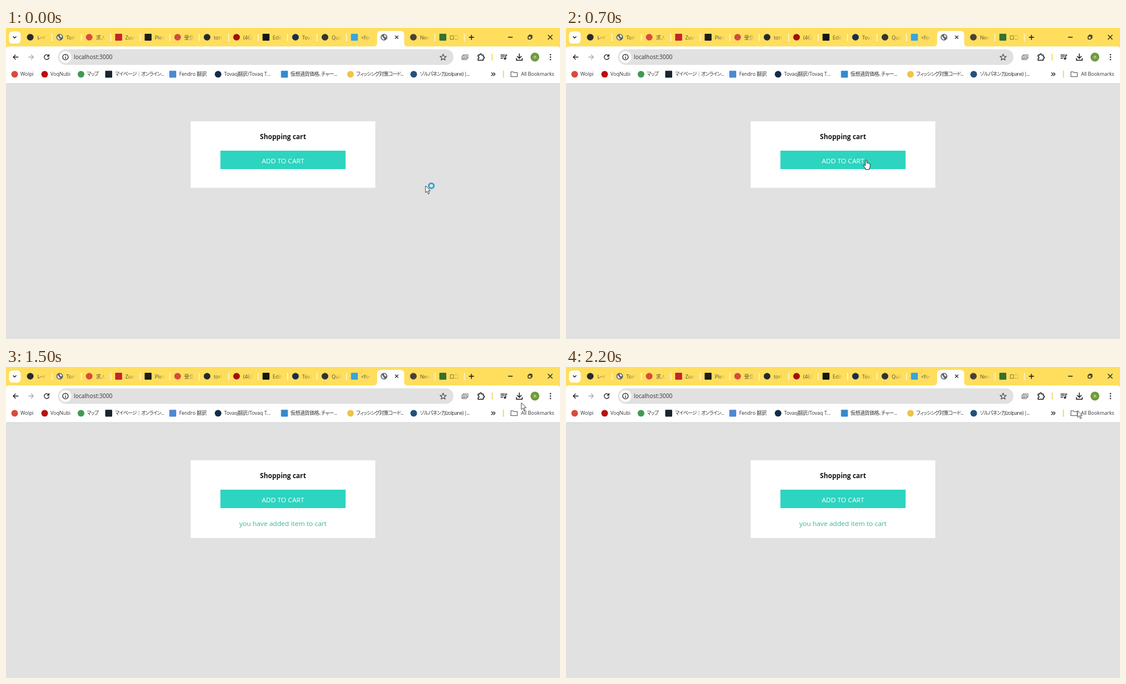
These frames come from a looping animation (960x540 px, 2.3 s). An HTML page:

```html
<!DOCTYPE html>
<html lang="en">
<head>
<meta charset="utf-8">
<title>Shopping cart</title>
<style>
html, body { margin: 0; width: 100%; height: 100%; overflow: hidden; background: #e1e1e1; }
svg { display: block; width: 960px; height: 540px; }
text { font-family: "Open Sans", "Noto Sans CJK JP", "Noto Sans CJK", sans-serif; font-feature-settings: "palt"; }
.line { fill: none; stroke: #222; stroke-width: 1.3; stroke-linecap: round; stroke-linejoin: round; }
.tab { font-size: 8.8px; fill: #5a5030; }
.mark { font-size: 8.6px; fill: #333; }
.cart { font-size: 11.6px; text-anchor: middle; }

#cursor, #arrow, #hand, #busy, #added, #hover { animation: 2300ms step-end infinite; }
#cursor { animation-name: move; }
#arrow { animation-name: arrow; }
#hand { animation-name: hand; }
#busy { animation-name: busy; }
#added { animation-name: added; }
#hover { animation-name: hover; }

@keyframes move {
  0% { transform: translate(727px, 274px); animation-timing-function: steps(5); }
  21.739% { transform: translate(492px, 230px); animation-timing-function: steps(4); }
  39.13% { transform: translate(548px, 228px); animation-timing-function: steps(3); }
  52.173% { transform: translate(549px, 246px); animation-timing-function: steps(3); }
  65.217% { transform: translate(893px, 62px); animation-timing-function: steps(3); }
  78.26% { transform: translate(911.5px, 55.5px); animation-timing-function: steps(4); }
  95.652%, 100% { transform: translate(886.5px, 75.5px); }
}
@keyframes arrow {
  0%, 56.521% { opacity: 1; }
  17.391% { opacity: 0; }
  100% { opacity: 1; }
}
@keyframes hand {
  0%, 56.521% { opacity: 0; }
  17.391% { opacity: 1; }
  100% { opacity: 0; }
}
@keyframes busy {
  0% { opacity: 1; }
  8.695%, 100% { opacity: 0; }
}
@keyframes added {
  0% { opacity: 0; }
  43.478%, 100% { opacity: 1; }
}
@keyframes hover {
  0%, 86.956%, 100% { opacity: 0; }
  73.913% { opacity: 1; }
}
</style>
</head>
<body>
<svg viewBox="0 0 960 540">
  <defs>
    <linearGradient id="fade">
      <stop offset="0" stop-color="#ffde5e" stop-opacity="0"/>
      <stop offset="1" stop-color="#ffde5e"/>
    </linearGradient>
    <g id="globe">
      <circle r="5.8" fill="#5f6368"/>
      <path d="M-4.3 -2Q-2 -1.5 -1.5 .2T.8 2.4L-.4 4.6Q-4.4 3.6 -4.3 -2ZM0 -4.5Q3.4 -4 4.3 -.4L2 .4 .4 -1.6Z" fill="#eee"/>
    </g>
  </defs>

  <!-- Browser frame -->
  <rect width="960" height="97" fill="#ffde5e"/>
  <path d="M0 97V37Q0 32 5 32H637Q643 32 643 26V12Q643 5 650 5H683Q690 5 690 12V26Q690 32 696 32H955Q960 32 960 37V97Z" fill="#fff"/>
  <path d="M0 96.5H960" stroke="#d2d2d2"/>
  <rect x="5" y="6" width="20.5" height="21" rx="6" fill="#fffdf5"/>
  <path class="line" d="M12.5 15L15 17.5 17.5 15"/>
  <g id="tabs"></g>
  <use href="#globe" x="655" y="16"/>
  <path class="line" d="M674.6 13.6L679.4 18.4M679.4 13.6L674.6 18.4"/>
  <path class="line" d="M806.5 12.5V20M802.7 16.2H810.3"/>
  <g class="line" stroke-width="1">
    <path d="M870.5 16H877.5M939.5 12.5L946.5 19.5M946.5 12.5L939.5 19.5"/>
    <path d="M906.5 12.5H910.5Q911.5 12.5 911.5 13.5V17.5"/>
    <rect x="904.7" y="14" width="5.3" height="5.3" rx="1"/>
  </g>

  <!-- Toolbar -->
  <path class="line" d="M21 50.5H12.5M16.3 46.7L12.5 50.5 16.3 54.3"/>
  <path class="line" d="M39 50.5H47.5M43.7 46.7L47.5 50.5 43.7 54.3" style="stroke:#aaa"/>
  <path class="line" d="M74 48.4A4.2 4.2 0 1 0 74.5 51.5M74.5 46V49H71.5"/>
  <rect x="90" y="37" width="685.5" height="27" rx="13.5" fill="#e1e1e1"/>
  <circle cx="103" cy="50.5" r="10.2" fill="#fff"/>
  <circle class="line" cx="103" cy="50.5" r="4.8"/>
  <path class="line" d="M103 50.3V53M103 48V48.1"/>
  <text x="117.5" y="54.3" font-size="9.95" fill="#333">localhost:3000</text>
  <path class="line" id="star" style="stroke:#444;stroke-width:1.1"/>
  <g class="line" style="stroke:#777;stroke-width:1.1">
    <path d="M792 48V46.5H800.5V52.5H799"/>
    <rect x="790" y="48.5" width="8.5" height="6.5" rx="1" fill="#ddd"/>
    <path d="M791.5 53.5L793.5 51.5 795 53 796.5 52"/>
  </g>
  <path class="line" style="stroke-width:1.5" d="M818 47H821V46.2A1.5 1.5 0 0 1 824 46.2V47H827V50H827.6A1.5 1.5 0 0 1 827.6 53H827V56H818V53.2A1.7 1.7 0 0 0 818 49.8Z"/>
  <path d="M842.5 44.5V56.5M862 74V86.5" stroke="#f8d75c" stroke-width="1.8"/>
  <path class="line" d="M857.5 47H864M857.5 49.8H864M857.5 52.6H861M866 53.3V47H868"/>
  <circle cx="864.5" cy="53.3" r="1.8" fill="#222"/>
  <path class="line" style="stroke-width:1.6" d="M889.5 45V52.5M886 49.3L889.5 52.7 893 49.3M884.5 53V56H894.5V53"/>
  <circle id="hover" cx="916.5" cy="50.5" r="11.5" fill="#ececec"/>
  <circle cx="916.5" cy="50.5" r="7.7" fill="#719a3b"/>
  <text x="916.5" y="53.2" font-size="7" text-anchor="middle" fill="#dce8c8">木</text>
  <path d="M943.5 46.3V55" stroke="#222" stroke-width="2.4" stroke-linecap="round" stroke-dasharray="0 4.2"/>

  <!-- Bookmarks -->
  <g id="marks"></g>
  <path class="line" d="M841.5 77.7L844 80.2 841.5 82.7M845 77.7L847.5 80.2 845 82.7"/>
  <path class="line" style="stroke:#555;stroke-width:1.1" d="M875 76H879L880.3 77.5H886V84.5H875Z"/>
  <text class="mark" x="892.5" y="83.4">All Bookmarks</text>

  <!-- Page -->
  <rect y="97" width="960" height="443" fill="#e1e1e1"/>
  <rect x="320" y="162" width="320" height="115.5" fill="#fff"/>
  <g id="added">
    <rect x="320" y="277" width="320" height="20" fill="#fff"/>
    <text class="cart" x="480" y="276.3" fill="#36b598">you have added item to cart</text>
  </g>
  <text class="cart" x="480" y="192.8" font-weight="700" fill="#151515">Shopping cart</text>
  <rect x="371.5" y="213" width="217" height="32" fill="#2dd4bf"/>
  <text class="cart" x="480" y="234.5" fill="#fff">ADD TO CART</text>

  <g id="cursor">
    <g id="arrow">
      <path d="M0 0V12L2.8 9.4 4.8 14.2 6.7 13.4 4.7 8.7H8.4Z" fill="#fff" stroke="#333" stroke-width=".9" stroke-linejoin="round"/>
      <circle id="busy" cx="10" cy="0" r="4.4" fill="none" stroke="#2b9fd6" stroke-width="2.8"/>
    </g>
    <path id="hand" d="M-1.3 1Q0 -.8 1.3 1V5.6Q2.4 4.7 3.5 6 4.7 5.2 5.5 6.6 6.7 6.2 7 7.6V11.5Q6.8 13.7 5.6 15V16.8H-1V15Q-2.6 13.2 -4.7 9.6 -4.9 8 -3.3 8.4L-1.3 10.3Z" fill="#fff" stroke="#222" stroke-linejoin="round"/>
  </g>
</svg>
<script>
const byId = id => document.getElementById(id);
const dot = (x, y, color) => `<circle cx="${x}" cy="${y}" r="5.8" fill="${color}"/>`;
const box = (x, y, color) => `<rect x="${x - 6}" y="${y - 6}" width="12" height="12" rx="1" fill="${color}"/>`;
const globe = (x, y) => `<use href="#globe" x="${x}" y="${y}"/>`;

const tabs = [
  [dot, "#24292f", "レイアウト"], [globe, "", "Tori"], [dot, "#d94a3d", "求人"],
  [box, "#c4232f", "Zuvo"], [box, "#1c1c1c", "Plen"], [dot, "#d94a3d", "受信"],
  [dot, "#24292f", "tori"], [dot, "#a50f0f", "(46)"], [box, "#151515", "Edit"],
  [dot, "#17304d", "Tova"], [dot, "#333", "Quil"], [box, "#39a5dc", "&lt;form"],
  null, [dot, "#4a4038", "New"], [box, "#35702f", "ロコモ"]
];
byId("tabs").innerHTML = tabs.map((tab, i) => {
  if (!tab) return "";
  const [icon, color, label] = tab, x = 42 + i * 51.07;
  const edge = i === 11 ? "" : `<path d="M${x + 37.5} 10V23" stroke="#fff5cf" stroke-width="1.6"/>`;
  return icon(x, 16, color) +
    `<text class="tab" x="${x + 11.5}" y="19.7">${label}</text>` +
    `<rect x="${x + 18}" y="9" width="10.5" height="15" fill="url(#fade)"/>` +
    `<rect x="${x + 28.3}" y="9" width="${i === 11 ? 10 : 30}" height="15" fill="#ffde5e"/>` + edge;
}).join("") + `<path class="line" d="M806.5 12.5V20M802.7 16.2H810.3"/>`;

// icon, colour, icon x, text x, letter spacing, label
const marks = [
  [dot, "#d94a3d", 15, 25, 0, "Wolpi"],
  [dot, "#b80f0f", 67, 77, 0, "VoqNubi"],
  [dot, "#3d9a54", 130, 140, -.7, "マップ"],
  [box, "#1b2433", 178, 189, -.7, "マイページ｜オンライン..."],
  [box, "#4a8ad4", 289, 300, 0, "Fendro 翻訳"],
  [dot, "#142c48", 367.5, 378, 0, "Tovaq翻訳/Tovaq T..."],
  [box, "#3489cf", 482.5, 493, -.4, "仮想通貨価格、チャー..."],
  [dot, "#f2c14b", 597, 607, -.7, "フィッシング対策コード..."],
  [dot, "#244f7d", 706.5, 717, -.6, "ゾルパネンカ(zolpane) |..."]
];
byId("marks").innerHTML = marks.map(([icon, color, ix, x, gap, label]) =>
  icon(ix, 80.3, color) + `<text class="mark" x="${x}" y="83.4" letter-spacing="${gap}">${label}</text>`
).join("");

const star = Array.from({ length: 10 }, (_, i) => {
  const r = i % 2 ? 2.5 : 5.8, a = i * Math.PI / 5;
  return `${757.5 + r * Math.sin(a)} ${51 - r * Math.cos(a)}`;
});
byId("star").setAttribute("d", `M${star.join("L")}Z`);
</script>
</body>
</html>
```
